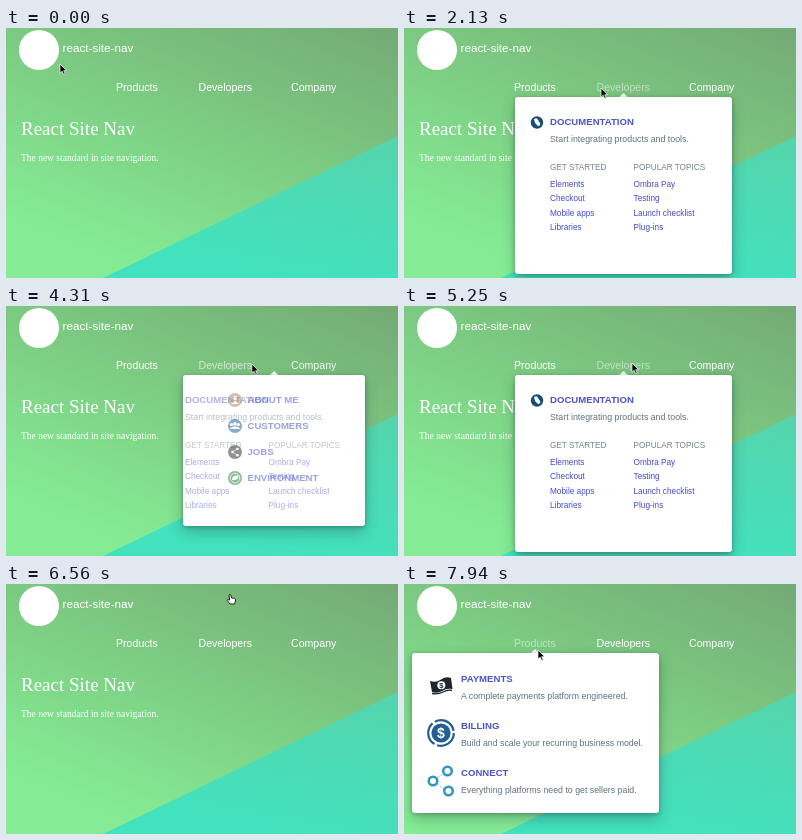
An HTML page for the animation above (8000 ms loop, 392 by 250 pixels).

```html
<!DOCTYPE html>
<html lang="en">
<head>
<meta charset="utf-8">
<title>react-site-nav</title>
<style>
  html, body { margin: 0; width: 100%; height: 100%; overflow: hidden; }
  .stage {
    position: relative; width: 392px; height: 250px; overflow: hidden;
    background: linear-gradient(203deg, #74aa74, #7dcd83 45%, #85ec95 85%);
    font-family: "Liberation Sans", Arial, sans-serif;
  }
  svg { position: absolute; display: block; overflow: visible; }
  .page { left: 0; top: 0; fill: #fff; }
  .serif { font-family: "Liberation Serif", Times, serif; }
  .nav { font-size: 10.6px; }

  .drop, .box, .caret, .cursor { position: absolute; }
  .drop {
    left: 0; top: 0; width: 392px; height: 250px; transform-origin: 50% 64px;
    animation: reveal 8s infinite;
  }
  .box {
    top: 69px; overflow: hidden; background: #fff; border-radius: 3px;
    box-shadow: 0 6px 14px rgba(30, 60, 60, .32), 0 1px 4px rgba(0, 0, 0, .25);
    animation: morph 8s infinite;
  }
  .caret {
    left: -5px; top: 64.5px; width: 0; height: 0;
    border: 5px solid transparent; border-top: 0; border-bottom-color: #fff;
    animation: caret 8s infinite;
  }
  .panel { left: 0; top: 0; animation: 8s infinite; }
  .head { font-size: 9.6px; font-weight: bold; fill: #4d54cb; }
  .text { font-size: 8.8px; fill: #61707d; }
  .label { font-size: 8.2px; fill: #74838f; }
  .link { font-size: 8.25px; fill: #444bd0; }

  .products { animation-name: products; }
  .developers { animation-name: developers; }
  .company { animation-name: company; }
  .nav text { animation: 8s infinite; }
  .nav .n1 { animation-name: dim1; }
  .nav .n2 { animation-name: dim2; }
  .nav .n3 { animation-name: dim3; }

  .cursor { left: 0; top: 0; animation: move 8s infinite ease-in-out; }
  .arrow { animation: arrow 8s infinite step-end; }
  .hand { animation: hand 8s infinite step-end; }

  @keyframes reveal {
    0%, 10%, 76%, 94% { opacity: 0; transform: perspective(600px) rotateX(-15deg); }
    12.8%, 73%, 96.8%, 100% { opacity: 1; transform: perspective(600px) rotateX(0); }
  }
  @keyframes morph {
    0%, 21%, 76.1%, 100% { left: 8px; width: 247px; height: 160px; }
    24.3%, 34%, 56.3%, 76% { left: 111px; width: 217px; height: 177px; }
    37.3%, 53% { left: 231.5px; width: 153px; height: 130px; }
  }
  @keyframes caret {
    0%, 21%, 76.1%, 100% { transform: translateX(131px); }
    24.3%, 34%, 56.3%, 76% { transform: translateX(219.5px); }
    37.3%, 53% { transform: translateX(308px); }
  }
  @keyframes products {
    0%, 21%, 76.1%, 100% { opacity: 1; transform: none; }
    24.3%, 76% { opacity: 0; transform: translateX(-60px); }
  }
  @keyframes developers {
    0%, 21%, 76.1%, 100% { opacity: 0; transform: translateX(60px); }
    24.3%, 34%, 56.3%, 76% { opacity: 1; transform: none; }
    37.3%, 53% { opacity: 0; transform: translateX(-60px); }
  }
  @keyframes company {
    0%, 34%, 56.3%, 100% { opacity: 0; transform: translateX(60px); }
    37.3%, 53% { opacity: 1; transform: none; }
  }
  @keyframes dim1 {
    0%, 10%, 23%, 94% { opacity: 1; }
    12%, 21%, 96%, 100% { opacity: .5; }
  }
  @keyframes dim2 {
    0%, 21%, 36%, 53%, 75%, 100% { opacity: 1; }
    23%, 34%, 55%, 73% { opacity: .5; }
  }
  @keyframes dim3 {
    0%, 34%, 55%, 100% { opacity: 1; }
    36%, 53% { opacity: .5; }
  }
  @keyframes move {
    0%, 3% { transform: translate(54px, 36px); }
    10% { transform: translate(128px, 54px); }
    15.6%, 18% { transform: translate(132px, 58px); }
    21% { transform: translate(193px, 60px); }
    26.6% { transform: translate(197px, 60px); }
    30% { transform: translate(230px, 60px); }
    34% { transform: translate(286px, 58px); }
    42.2%, 50% { transform: translate(293px, 58px); }
    53% { transform: translate(246px, 58px); }
    65.6%, 71% { transform: translate(228px, 57px); }
    74% { transform: translate(226px, 46px); }
    80%, 84% { transform: translate(223px, 10px); }
    94% { transform: translate(140px, 54px); }
    99.2%, 100% { transform: translate(134px, 66px); }
  }
  @keyframes arrow { 0%, 91% { opacity: 1; } 76% { opacity: 0; } }
  @keyframes hand { 0%, 91% { opacity: 0; } 76% { opacity: 1; } }
</style>
</head>
<body>
<div class="stage">
  <svg class="page" width="392" height="250">
    <defs>
      <linearGradient id="teal" x1="1" y1="0" x2=".6" y2="1">
        <stop stop-color="#55d4ac"/><stop offset="1" stop-color="#42e2be"/>
      </linearGradient>
    </defs>
    <path d="M97 250L392 108V250Z" fill="url(#teal)"/>
    <circle cx="33" cy="22" r="20"/>
    <text x="56.5" y="24" font-size="11.7">react-site-nav</text>
    <g class="nav">
      <text class="n1" x="110" y="63">Products</text>
      <text class="n2" x="192.5" y="63">Developers</text>
      <text class="n3" x="285" y="63">Company</text>
    </g>
    <g class="serif">
      <text x="15" y="107" font-size="19">React Site Nav</text>
      <text x="15" y="133" font-size="9.5">The new standard in site navigation.</text>
    </g>
  </svg>

  <div class="drop">
    <div class="caret"></div>
    <div class="box">
      <svg class="panel products" width="247" height="160" viewBox="8 69 247 160">
        <g class="head">
          <text x="57" y="98">PAYMENTS</text>
          <text x="57" y="145">BILLING</text>
          <text x="57" y="192">CONNECT</text>
        </g>
        <g class="text">
          <text x="57" y="115">A complete payments platform engineered.</text>
          <text x="57" y="162">Build and scale your recurring business model.</text>
          <text x="57" y="209">Everything platforms need to get sellers paid.</text>
        </g>
        <g fill="#20262a">
          <path d="M26 97Q32 99 37 95.500T47 94L48.500 105Q43 104 38 107T28 108Z"/>
          <path d="M28 109.500Q34 110.500 39 108T48 106.500" fill="none" stroke="#20262a" stroke-width="1.300"/>
          <circle cx="37.300" cy="101.300" r="4" fill="#fff"/>
          <text x="37.300" y="104" font-size="7.500" font-weight="bold" text-anchor="middle">$</text>
        </g>
        <g fill="none" stroke="#235f92">
          <circle cx="37" cy="149" r="12.800" stroke-width="2.200" stroke-dasharray="24 2.800"/>
          <circle cx="37" cy="149" r="9.600" fill="#235f92" stroke="none"/>
          <text x="37" y="154" font-size="14" font-weight="bold" text-anchor="middle" fill="#fff" stroke="none">$</text>
        </g>
        <g fill="#fff" stroke="#3295bf">
          <path d="M43 187L30 197L44 208" fill="none" stroke="#a9cbd9" stroke-dasharray="2 1"/>
          <g stroke-width="2.500">
            <circle cx="43.500" cy="187" r="4.300"/>
            <circle cx="29" cy="197" r="4.300"/>
            <circle cx="44.500" cy="207" r="4.300"/>
          </g>
        </g>
      </svg>

      <svg class="panel developers" width="217" height="177" viewBox="111 69 217 177">
        <circle cx="133" cy="94.500" r="6.200" fill="#194c78"/>
        <path d="M130 91Q133 89 134 92L136 95Q137 98 134 98L131 95Z" fill="#fff"/>
        <text class="head" x="146" y="97">DOCUMENTATION</text>
        <text class="text" x="146" y="114">Start integrating products and tools.</text>
        <g class="label">
          <text x="146" y="142">GET STARTED</text>
          <text x="229.500" y="142">POPULAR TOPICS</text>
        </g>
        <g class="link">
          <text x="146" y="159">Elements</text>
          <text x="146" y="173.300">Checkout</text>
          <text x="146" y="187.500">Mobile apps</text>
          <text x="146" y="201.700">Libraries</text>
          <text x="229.500" y="159">Ombra Pay</text>
          <text x="229.500" y="173.300">Testing</text>
          <text x="229.500" y="187.500">Launch checklist</text>
          <text x="229.500" y="201.700">Plug-ins</text>
        </g>
      </svg>

      <svg class="panel company" width="153" height="130" viewBox="231.5 69 153 130">
        <g class="head">
          <text x="269" y="97">ABOUT ME</text>
          <text x="269" y="123">CUSTOMERS</text>
          <text x="269" y="149">JOBS</text>
          <text x="269" y="175">ENVIRONMENT</text>
        </g>
        <circle cx="256.500" cy="94" r="7" fill="#b18a70"/>
        <circle cx="256.500" cy="120" r="7" fill="#23679b"/>
        <circle cx="256.500" cy="146" r="7" fill="#343a40"/>
        <circle cx="256.500" cy="172" r="7" fill="#2c8540"/>
        <g fill="#fff">
          <circle cx="256.500" cy="92" r="2"/>
          <path d="M252.500 98Q256.500 92.500 260.500 98Z"/>
          <circle cx="253" cy="118.500" r="1.500"/>
          <circle cx="260" cy="118.500" r="1.500"/>
          <circle cx="256.500" cy="117.800" r="1.900"/>
          <path d="M250.800 123Q256.500 117.500 262.200 123Z"/>
          <path d="M259 142.800L254 146L259 149.200" fill="none" stroke="#ddd" stroke-width=".8"/>
          <circle cx="259" cy="142.800" r="1.200"/>
          <circle cx="254" cy="146" r="1.200"/>
          <circle cx="259" cy="149.200" r="1.200"/>
          <circle cx="256.500" cy="172" r="4.800" fill="none" stroke="#fff" stroke-width=".8"/>
          <path d="M253.500 174Q253 169 260 169.500Q260 175 253.500 174Z"/>
        </g>
      </svg>
    </div>
  </div>

  <svg class="cursor" width="12" height="14" stroke-linejoin="round">
    <path class="arrow" d="M0 0V9.200L2.200 7.200L3.700 10.600L5.200 9.900L3.700 6.700H6.600Z" fill="#000" stroke="#fff" stroke-width=".7"/>
    <path class="hand" d="M0 1Q1 -.5 1.800 1L2.500 4L5.500 4.300Q6.800 4.800 6.500 7L5.500 10H1L-1.800 6.500Q-2 5 .6 6Z" fill="#fff" stroke="#111" stroke-width=".9"/>
  </svg>
</div>
</body>
</html>
```
